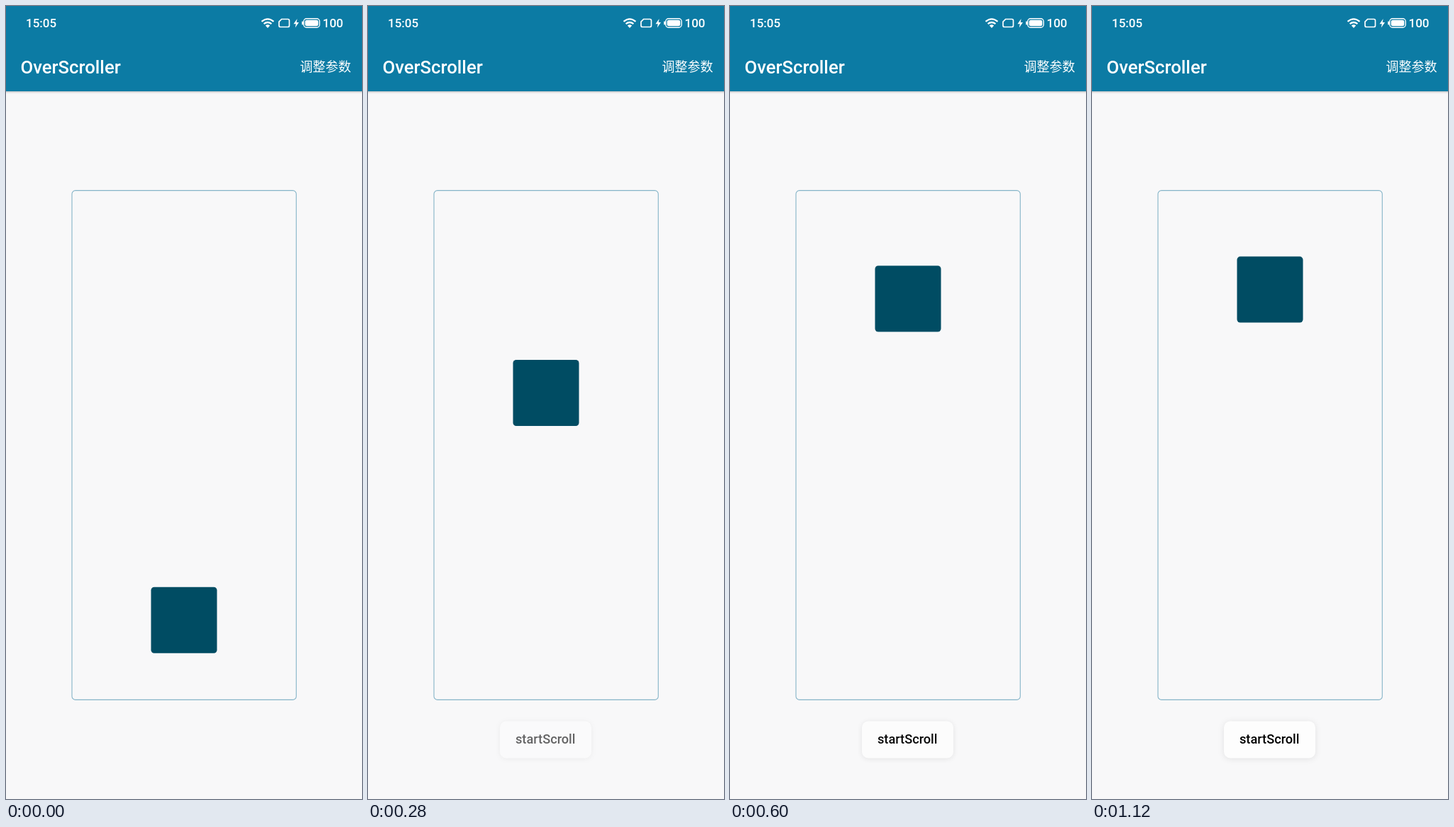
Animation, 502 px wide and 1116 px high, one loop 1200 ms. Source, as an HTML page:

```html
<!DOCTYPE html>
<html lang="zh">
<head>
<meta charset="utf-8">
<style>
html, body { margin: 0; width: 100%; height: 100%; overflow: hidden; background: #f8f8f9; }
svg { display: block; width: 502px; height: 1116px; font: 500 17px Roboto, sans-serif; }
.bar { fill: #0c7ba4; filter: drop-shadow(0 1px 1.5px #0004); }
.line { fill: none; stroke: #fff; stroke-width: 1.7; }
#button rect { fill: #fdfdfd; filter: drop-shadow(0 1px 4px #00000018); }
</style>
</head>
<body>
<svg viewBox="0 0 502 1116">
  <rect width="502" height="1116" fill="#f8f8f9"/>
  <rect class="bar" x="-10" y="-10" width="522" height="130"/>
  <g fill="#fff">
    <text x="28" y="30">15:05</text>
    <text x="446.5" y="30">100</text>
    <text x="20.5" y="94.5" font-size="25.7">OverScroller</text>
    <text x="414.5" y="91.5" style="font: 400 18px 'Noto Sans CJK SC', 'Noto Sans CJK', sans-serif">调整参数</text>
    <!-- status icons -->
    <g class="line" style="stroke-width: 2.2">
      <path d="M360.5 21.8Q369 14.8 377.5 21.8"/>
      <path d="M363.6 25.2Q369 20.8 374.4 25.2"/>
    </g>
    <path d="M365.8 27.4Q369 25 372.2 27.4L369 31Z"/>
    <path class="line" d="M388.6 18.5H397.5Q399.5 18.5 399.5 20.5V27.5Q399.5 29.5 397.5 29.5H387Q385 29.5 385 27.5V22.2Z"/>
    <path d="M410.6 18L405.5 25.2H408.8L407.8 30.5L413 23H409.7Z"/>
    <rect class="line" x="419.8" y="17.8" width="22.4" height="12.4" rx="4" style="stroke-width: 1.4"/>
    <rect x="421.7" y="19.7" width="18.6" height="8.6" rx="2.4"/>
    <rect x="417.2" y="21.5" width="1.8" height="5" rx=".8"/>
  </g>
  <rect x="93" y="259.6" width="316.3" height="716.8" rx="5" fill="none" stroke="#85b4c8" stroke-width="1.1"/>
  <rect id="box" x="204.5" width="93" height="93" rx="4.5" fill="#004c63"/>
  <g id="button">
    <rect x="186" y="1006.5" width="129" height="52" rx="9"/>
    <text x="250.2" y="1038.2" font-size="18.2" text-anchor="middle">startScroll</text>
  </g>
</svg>
<script>
const LOOP = 1200, STEP = 40, LAST = 1120;
const START = 53, RATE = 0.0075, FROM = 817.7, TO = 352.3;
const box = document.getElementById('box');
const button = document.getElementById('button');

// Viscous fluid curve: slow start, exponential settling.
function viscous(x) {
  if (x <= 0) return 0;
  return x < 1 ? x - 1 + Math.exp(-x) : 1 - (1 - 1 / Math.E) * Math.exp(1 - x);
}

function draw(now) {
  const t = Math.min(LAST, Math.floor(now % LOOP / STEP) * STEP);
  const p = viscous((t - START) * RATE);
  box.setAttribute('y', FROM + (TO - FROM) * p);
  button.setAttribute('opacity', p ** 1.4);
}

function tick() {
  draw(performance.now());
  requestAnimationFrame(tick);
}
tick();
</script>
</body>
</html>
```
